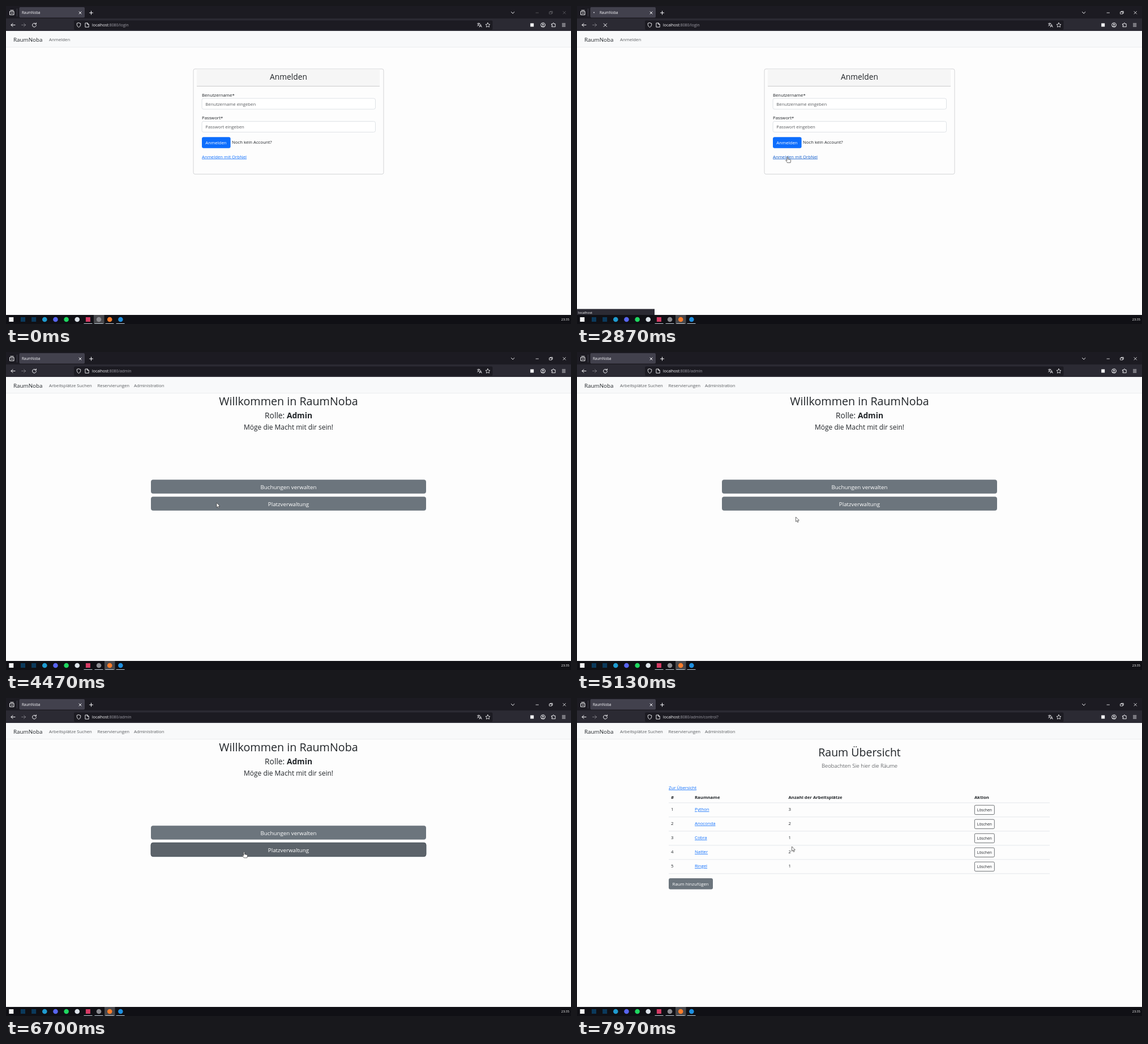
An HTML page for the animation above (8000 ms loop, 998 px wide and 561 px high).

```html
<!DOCTYPE html>
<html lang="de">
<head>
<meta charset="utf-8">
<title>RaumNoba</title>
<style>
  html, body { margin: 0; width: 100%; height: 100%; overflow: hidden; background: #fdfdfd; }
  svg { display: block; width: 100vw; height: 100vh; }
  text { font-family: "Open Sans", "Noto Sans", sans-serif; fill: #212529; white-space: pre; }
  .line { fill: none; stroke: #fbfbfe; stroke-width: 1; stroke-linecap: round; stroke-linejoin: round; }
</style>
</head>
<body>
<svg id="stage" viewBox="0 0 998 561" preserveAspectRatio="none"></svg>
<script>
const LOOP = 8000;
const BRAND = 'RaumNoba';
const GREY = '#6c757d', MUTED = '#595c5f', LINK = '#0d6efd', LIGHT = '#fbfbfe';

const text = (x, y, size, str, attrs = '') =>
  `<text x="${x}" y="${y}" font-size="${size}" ${attrs}>${str}</text>`;
const centred = (y, size, str, attrs = '') => text(499, y, size, str, `text-anchor="middle" ${attrs}`);
const rect = (x, y, w, h, fill, attrs = '') =>
  `<rect x="${x}" y="${y}" width="${w}" height="${h}" fill="${fill}" ${attrs}/>`;
const circle = (x, y, r, fill, attrs = '') => `<circle cx="${x}" cy="${y}" r="${r}" fill="${fill}" ${attrs}/>`;
const line = (d, attrs = '') => `<path class="line" d="${d}" ${attrs}/>`;
const group = (id, content, attrs = '') => `<g id="${id}" ${attrs}>${content}</g>`;
const link = (x, y, str, attrs = '') =>
  text(x, y, 7.75, str, `style="fill:${LINK}" text-decoration="underline" ${attrs}`);
const white = 'style="fill:#fff"';
const muted = `style="fill:${MUTED}"`;

function browser() {
  const tabs = rect(0, 0, 998, 22, '#1c1b22') + rect(23.5, 2, 115.5, 18.5, '#42414d', 'rx="2"')
    + line('M7 9.5h7v6h-7zM8 7.5h5M9 12.5h3')
    + line('M19.5 5v13', 'stroke="#42414d" style="stroke:#42414d"')
    + text(28, 13.9, 6.2, BRAND, `id="tabTitle" style="fill:${LIGHT}"`)
    + circle(30, 11.5, 1, '#d8d8de', 'id="throbber"')
    + line('M129 10l4 4m0-4l-4 4M147.5 12h6m-3-3v6M892.5 10.5l2.7 2.7 2.7-2.7', 'stroke-width=".9"')
    + group('controls', line('M936 12h4.5M960 10.5h4v3.5h-4zM961.3 10.5v-1.2h4v3.5h-1.2M984 9.5l4.5 4.5m0-4.5l-4.5 4.5',
      'style="stroke-width:.8"'));
  const toolbar = rect(0, 22, 998, 22, '#2b2a33') + rect(120, 25.5, 739.5, 16.5, '#1c1b22', 'rx="2"')
    + line('M16 33.5H9m3-3l-3 3 3 3')
    + line('M27.5 33.5h7m-3-3l3 3-3 3', 'opacity=".35"')
    + group('reload', line('M52.6 31.5a3.4 3.4 0 1 0 .8 2.5M53.3 29.7v2.3H51'))
    + group('stop', line('M47.2 31l5.4 5.4m0-5.4l-5.4 5.4'))
    + line('M128.5 29.7l3.2 1.1v2.6q-.3 2.8-3.2 4.2q-2.9-1.4-3.2-4.2v-2.6zM140.3 30h3.6l2.3 2.2v5h-5.9zM143.6 30v2.4h2.4',
      'style="stroke-width:.9"')
    + text(152, 36.3, 6.9, '', `id="url" style="fill:#a09fa8"`)
    + group('translate', line('M832.5 31h4.6M834.8 30v1M836.3 31q-.8 3-3.6 4.2M833.4 32.3q1 2 2.4 2.6M836.2 37.2l2-4.8 2 4.8M836.9 35.7h2.6',
      'style="stroke-width:.8"'))
    + line('M851 29.6l1.2 2.5 2.8.4-2 1.9.5 2.8-2.5-1.3-2.5 1.3.5-2.8-2-1.9 2.8-.4z', 'style="stroke-width:.8"')
    + rect(926.2, 30.5, 6, 6, LIGHT)
    + line('M952.3 33.5a3.8 3.8 0 1 1-7.6 0a3.8 3.8 0 1 1 7.6 0M946.3 36q2.2-1.8 4.4 0') + circle(948.5, 32.5, 1.3, LIGHT)
    + line('M964 31.5h2v-1q1-1.6 2 0v1h2.2v5.2H964v-1.5h1q1-.8 0-1.6h-1z', 'style="stroke-width:.9"')
    + line('M982.5 31h5.4m-5.4 2.5h5.4m-5.4 2.5h5.4', 'style="stroke-width:.9"');
  return tabs + toolbar;
}

function taskbar() {
  const colours = ['#0b3a5c', '#0b3a5c', '#1f9bd0', '#5865f2', '#1ed760', '#dce3ea', '#d63a64', '#8b8b90', '#ff7d2a', '#1d8fe0'];
  const squares = [0, 1, 6];
  const icons = colours.map((c, i) => {
    const x = 30 + i * 19.15;
    return squares.includes(i) ? rect(x - 4, 549, 8, 8, c) : circle(x, 553, 4.3, c);
  }).join('');
  const marks = [145, 164, 183, 202].map(x => rect(x - 7.5, 559.8, 15, 1.2, '#a9b4bd')).join('');
  return rect(0, 545, 998, 16, '#101015') + rect(155, 545, 18.5, 16, '#48484c', 'id="active"')
    + rect(5.3, 549, 8, 8, '#f5f5f5') + icons + marks
    + text(995, 555.1, 5.6, '23:35', `text-anchor="end" ${white}`);
}

function loginPage() {
  const field = (y, label, hint) => text(346, y - 3.5, 7.75, label)
    + rect(346, y, 306.5, 19, '#fff', 'rx="3" stroke="#dee2e6"')
    + text(352.3, y + 12.6, 7.75, hint, muted);
  return text(76, 62.4, 7.8, 'Anmelden', muted)
    + rect(331, 111, 336, 185.7, '#fdfdfd', 'rx="3" stroke="#d3d4d6"')
    + rect(337, 111.5, 323, 30, '#f6f6f6') + rect(337, 141, 323, 1, '#cbcbcc')
    + centred(130, 13.8, 'Anmelden')
    + field(163, 'Benutzername*', 'Benutzername eingeben')
    + field(203.5, 'Passwort*', 'Passwort eingeben')
    + rect(346, 231.3, 50.6, 19.5, LINK, 'rx="3"') + text(352.3, 243.9, 7.8, 'Anmelden', white)
    + text(399, 243, 7.75, 'Noch kein Account?')
    + link(346, 268.6, 'Anmelden mit OrbNel', 'id="oauth"');
}

const memberNav = () => [[76, 'Arbeitsplätze Suchen'], [161.5, 'Reservierungen'], [226, 'Administration']]
  .map(([x, s]) => text(x, 62.4, 7.75, s, muted)).join('');

const adminPage = () => memberNav()
  + centred(94.4, 19.7, `Willkommen in ${BRAND}`)
  + centred(117, 13.8, 'Rolle: <tspan font-weight="700">Admin</tspan>')
  + centred(136.6, 11.95, 'Möge die Macht mit dir sein!')
  + rect(256, 225.3, 486, 24.4, GREY, 'rx="4"') + centred(241.9, 9.75, 'Buchungen verwalten', white)
  + rect(256, 255.3, 486, 24.4, GREY, 'rx="4" id="manage"') + centred(271.9, 9.75, 'Platzverwaltung', white);

function roomPage() {
  const bold = 'font-weight="700"';
  const head = [[166, '#'], [208, 'Raumname'], [373.5, 'Anzahl der Arbeitsplätze'], [702, 'Aktion']]
    .map(([x, s]) => text(x, 177.8, 7.75, s, bold)).join('') + rect(162, 184.5, 673, .8, '#dee2e6');
  const rooms = [['Python', 3], ['Anoconda', 2], ['Cobra', 1], ['Natter', 2], ['Ringel', 1]];
  const rows = rooms.map(([name, seats], i) => {
    const y = 199 + i * 25;
    return text(166, y, 7.75, i + 1) + link(208, y, name) + text(373.5, y, 7.75, seats)
      + rect(702.3, y - 9.8, 35, 16.4, '#fdfdfd', 'rx="2" stroke="#4a4e52" stroke-width=".8"')
      + text(719.8, y + .9, 6.75, 'Löschen', 'text-anchor="middle"')
      + rect(162, y + 10.5, 673, .8, '#dee2e6');
  }).join('');
  return memberNav()
    + centred(102.6, 19.5, 'Raum Übersicht')
    + centred(122.7, 9.55, 'Beobachten Sie hier die Räume', 'font-weight="300"')
    + link(162, 160.8, 'Zur Übersicht') + head + rows
    + rect(162, 318, 78, 19.5, GREY, 'rx="3"') + text(168.6, 330.8, 7.8, 'Raum hinzufügen', white);
}

const cursorShape = 'fill="#fff" stroke="#333" stroke-width=".7" stroke-linejoin="round"';
const arrow = `<path ${cursorShape} d="M0 0v8.3l1.9-1.8 1.3 3 1.3-.6-1.3-2.9h2.7z"/>`;
const hand = `<path ${cursorShape} d="M-1 .8q.9-1.6 1.8 0v3.4l3.9.8q1.2.4 1 1.8l-.7 3.6H-.5q-.6-1.5-2.6-3.6-.6-1 .5-1.1l1.6.9z"/>`;

document.getElementById('stage').innerHTML =
  rect(0, 0, 998, 561, '#fdfdfd')
  + rect(0, 44, 998, 28.5, '#f8f9fa') + rect(0, 72.3, 998, .8, '#e9eaec')
  + text(13, 63.2, 9.8, BRAND)
  + group('login', loginPage()) + group('admin', adminPage()) + group('rooms', roomPage())
  + browser()
  + group('status', rect(0, 534.5, 137, 10.5, '#2b2a33') + text(2, 542.6, 6, 'localhost', white))
  + taskbar()
  + group('cursor', group('arrow', arrow) + group('hand', hand));

const el = {};
document.querySelectorAll('[id]').forEach(node => el[node.id] = node);

// Pointer hotspot: time, x, y
const path = [
  [1300, -8, 372], [1780, 359.5, 342], [2080, 359.5, 342], [2520, 372, 266], [4500, 372, 266],
  [4920, 386.5, 291], [5200, 386.5, 291], [5580, 420.8, 271.5], [7560, 420.8, 271.5], [7880, 379.5, 262]
];
const CLICK_LOGIN = 2870, URL_ADMIN = 4150, SHOW_ADMIN = 4290;
const HOVER_MANAGE = 5390, CLICK_MANAGE = 7290, SHOW_ROOMS = 7530;

const within = (t, a, b) => t >= a && t < b;
const show = (node, on) => node.setAttribute('display', on ? 'inline' : 'none');
const clamp = v => Math.min(1, Math.max(0, v));

function pointer(t) {
  let i = 0;
  while (i < path.length - 2 && t >= path[i + 1][0]) i++;
  const [t0, x0, y0] = path[i], [t1, x1, y1] = path[i + 1];
  const p = clamp((t - t0) / (t1 - t0)), e = p * p * (3 - 2 * p);
  return [x0 + (x1 - x0) * e, y0 + (y1 - y0) * e];
}

function manageColour(t) {
  const hover = clamp((t - HOVER_MANAGE) / 150), press = clamp((t - CLICK_MANAGE + 70) / 150);
  return `rgb(${[[108, 92, 82], [117, 99, 92], [125, 106, 96]]
    .map(([a, b, c]) => Math.round(a + (b - a) * hover + (c - b) * press))})`;
}

let shownUrl;
function setUrl(route) {
  if (route === shownUrl) return;
  shownUrl = route;
  el.url.innerHTML = `<tspan fill="${LIGHT}" style="fill:${LIGHT}">localhost</tspan>:8080/${route}`;
}

function draw(t) {
  const firstLoad = within(t, CLICK_LOGIN, SHOW_ADMIN), secondLoad = within(t, CLICK_MANAGE, SHOW_ROOMS);
  const loading = firstLoad || secondLoad;
  const focused = t >= CLICK_LOGIN;

  show(el.login, t < SHOW_ADMIN);
  show(el.admin, within(t, SHOW_ADMIN, SHOW_ROOMS));
  show(el.rooms, t >= SHOW_ROOMS);
  setUrl(t < URL_ADMIN ? 'login' : t < SHOW_ROOMS ? 'admin' : 'admin/control?');

  show(el.status, loading);
  show(el.throbber, loading);
  show(el.stop, firstLoad);
  show(el.reload, !firstLoad);
  show(el.translate, !within(t, URL_ADMIN, SHOW_ADMIN));
  el.reload.setAttribute('transform', secondLoad ? 'rotate(120 50 33.7)' : '');
  el.tabTitle.setAttribute('x', loading ? 40 : 28);
  const since = t - (firstLoad ? CLICK_LOGIN : CLICK_MANAGE);
  el.throbber.setAttribute('cx', 35 - 5 * Math.cos(since / 1050 * 2 * Math.PI));

  el.controls.setAttribute('opacity', focused ? 1 : .3);
  el.active.setAttribute('x', focused ? 174 : 155);
  el.oauth.style.fill = t >= 2440 ? '#0a58ca' : LINK;
  el.manage.setAttribute('fill', manageColour(t));
  el.manage.setAttribute('stroke', t >= HOVER_MANAGE ? '#49525a' : 'none');

  const pointing = within(t, 2440, SHOW_ADMIN) || within(t, HOVER_MANAGE, SHOW_ROOMS);
  const [x, y] = pointer(t);
  show(el.cursor, t >= path[0][0]);
  show(el.arrow, !pointing);
  show(el.hand, pointing);
  el.cursor.setAttribute('transform', `translate(${x.toFixed(2)} ${y.toFixed(2)})`);
}

const start = performance.now();
function tick() {
  draw((performance.now() - start) % LOOP);
  requestAnimationFrame(tick);
}
tick();
</script>
</body>
</html>
```
